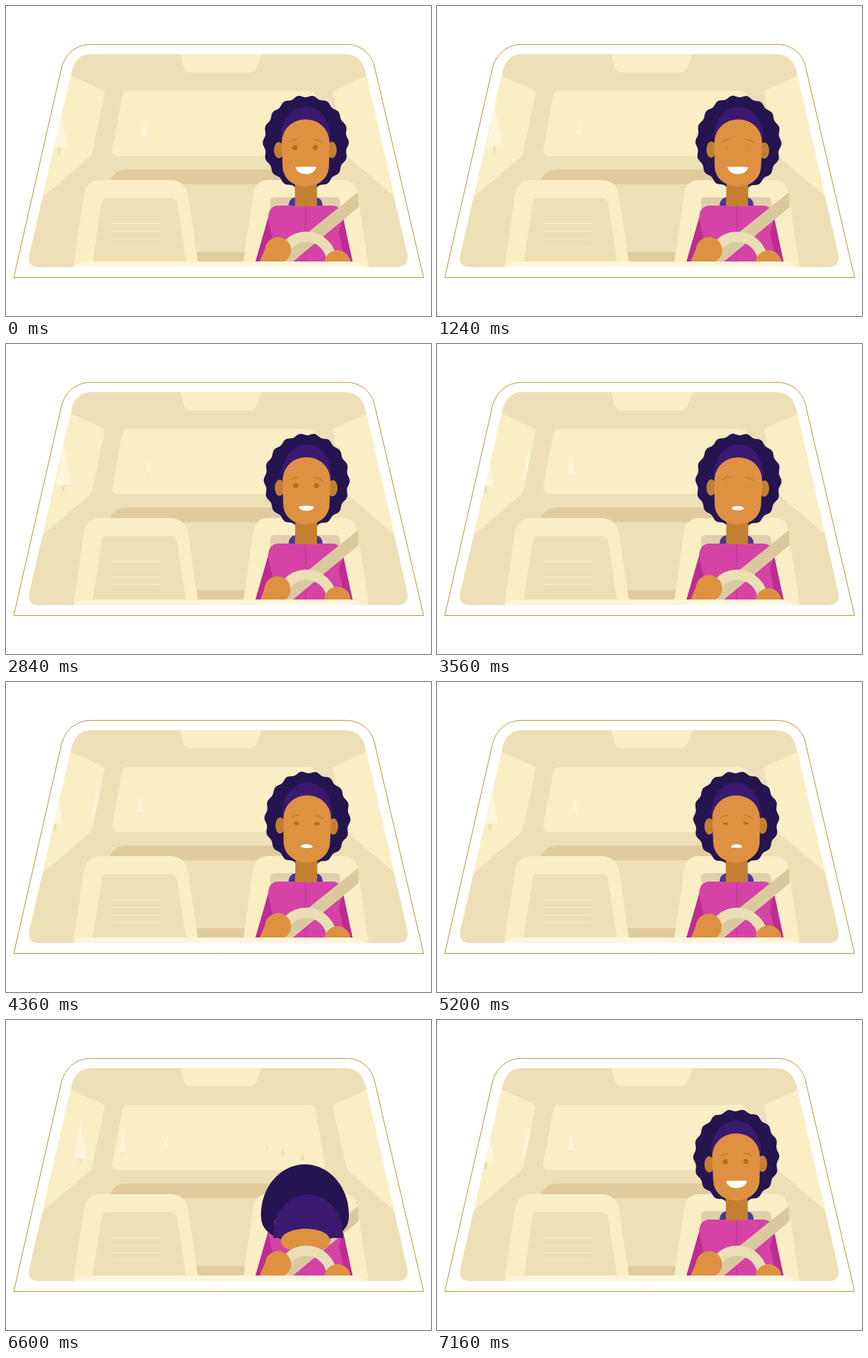
These frames come from a looping animation (600x438 px, 7.2 s). An HTML page with a canvas:

```html
<!DOCTYPE html>
<html lang="en">
<head>
<meta charset="utf-8">
<title>Drowsy driver</title>
<style>
html, body { margin: 0; width: 100%; height: 100%; overflow: hidden; background: #fff; }
canvas { display: block; }
</style>
</head>
<body>
<canvas id="stage" width="600" height="438"></canvas>
<script>
const LOOP = 7200, STEP = 40;
const ctx = document.getElementById('stage').getContext('2d');

const cream = '#faeec5', beige = '#ede0b6', sand = '#dfcb9e', pale = '#fdf5dc';
const skin = '#dd9141', skinDark = '#c57f32', eyeBrown = '#ae701c';
const hairDark = '#241450', capPurple = '#3a1a70', pink = '#d543a6', pinkDark = '#bd2c92';

const frame = new Path2D('M11 383.5L78 89C83 67 100 54.3 119 54.3H481C500 54.3 517 67 521 89L589.5 383.5Z');
const cabin = new Path2D('M119 68H480C494 68 504 77 507.500 92L567 352Q569 369 553 369H46Q30 369 32.500 352L92 95C95 78 105 68 119 68Z');
const rearWindow = 'M164 127Q166 120 173 120H428Q435 120 437 127L450 203Q451 212 441 212H159Q149 212 150 203Z';
const leftWindow = 'M86 96L135 118Q140 120 139 125L122 205Q121 211 116 215L46 275Z';
const rightWindow = 'M515 96L466 118Q461 120 462 125L480 206Q481 211 485 215L555 275Z';
const glass = new Path2D(rearWindow + leftWindow);

function fill(color, path) {
  ctx.fillStyle = color;
  ctx.fill(typeof path === 'string' ? new Path2D(path) : path);
}

function stroke(color, width, path) {
  ctx.strokeStyle = color;
  ctx.lineWidth = width;
  ctx.stroke(typeof path === 'string' ? new Path2D(path) : path);
}

function oval(color, x, y, rx, ry = rx) {
  ctx.fillStyle = color;
  ctx.beginPath();
  ctx.ellipse(x, y, rx, ry, 0, 0, Math.PI * 2);
  ctx.fill();
}

const mix = (a, b, k) => a + (b - a) * k;

// Eased interpolation over rows of [time, ...values].
function key(t, rows) {
  const i = rows.findIndex(row => row[0] > t);
  if (i === 0) return rows[0].slice(1);
  if (i < 0) return rows[rows.length - 1].slice(1);
  const [a, b] = [rows[i - 1], rows[i]];
  const u = (t - a[0]) / (b[0] - a[0]), k = u * u * (3 - 2 * u);
  return a.slice(1).map((v, j) => mix(v, b[j + 1], k));
}

// [time, half width, corner y, top y, bottom y]
const mouthKeys = [
  [1300, 14.5, 227.5, 227, 237.5], [2120, 12.8, 228.3, 228, 236.5],
  [3560, 8.7, 232, 229, 235], [5200, 8, 233, 229.3, 234.2],
  [6640, 8, 233, 229.3, 234.2], [6760, 14.5, 227.5, 227, 237.5]
];
const eyeKeys = [
  [1120, 1], [1200, .08], [1280, .08], [1400, 1], [2600, 1], [2680, .08], [2800, 1],
  [3400, 1], [3520, .08], [3640, .08], [3800, .7], [4600, .7], [4680, .08], [4840, .5],
  [5400, .5], [6000, .08], [6640, .08], [6720, 1], [6960, 1], [7000, .08], [7080, 1]
];
const nodKeys = [[6120, 0], [6400, 1], [6620, 1], [6720, 0]];
const stretchKeys = [[6640, 1], [6720, 1.325], [6840, 1]];
// [time, head tilt, wheel turn] in degrees
const swayKeys = [[0, -.3, 0], [80, -.8, -1.5], [200, -.1, -5], [360, 1.2, 0], [600, 1.2, 0], [640, -.3, 0]];

function trees(t) {
  ctx.save();
  ctx.clip(glass);
  const shift = t / STEP % 10 * 6;
  for (let x = 15 + shift; x < 246; x += 60) {
    const d = x - 80, top = 140 + .195 * d, base = 199 - .144 * d, w = 11 - .061 * d;
    ctx.fillStyle = beige;
    ctx.fillRect(x - w * .18, base, w * .36, (base - top) * .16);
    fill(pale, `M${x - w} ${base}L${x} ${top}L${x + w} ${base}Z`);
  }
  ctx.restore();
  ctx.fillStyle = beige;
  ctx.fillRect(366.5, 179, 2.5, 5);
  ctx.fillRect(389, 184.5, 3.5, 7);
  ctx.fillRect(416, 190, 4.5, 8.5);
}

function interior(t) {
  fill(beige, cabin);
  fill(cream, 'M246 68L250 84Q252 94 262 94H343Q351 94 354 86L361 68Z');
  fill(cream, rearWindow + leftWindow + rightWindow);
  trees(t);
  fill(sand, 'M144 252Q151 231 170 231H431Q449 231 457 252ZM262 348H342V362H262Z');
  fill(cream, 'M95 369L110 267Q113 246 134 246H231Q253 246 257 267L272 369Z');
  fill(beige, 'M122 364L135 279Q136 271.500 142 271.500H233Q240 271.500 241.500 279L254.500 364Z');
  for (let y = 307.5; y < 345; y += 10.8) stroke('#f9eec8', 1.3, `M150 ${y}H218`);
  fill(cream, 'M334 369L349 265Q352 246 370 246H476Q493 246 496 263L512 369Z');
  fill('#dfd0ab', 'M373 310V276Q373 270 379 270H465Q471 270 471.500 276L476 310Z');
}

function body() {
  fill('#45389a', 'M399 283Q399 271 410 270H436Q447 271 447 283Z');
  fill(pink, 'M370 299Q371 282 385 282H460Q474 282 476 299L489 362H352Z');
  fill(pinkDark, 'M370 300L352 362H368L376 328ZM476 300L489.500 362H479L470 320Z');
  stroke(pinkDark, .8, 'M423 282V361');
  fill('#dac99f', 'M495 264.500Q497 263 497 266L498 284L404 362H374Z');
}

function hair(nod) {
  ctx.beginPath();
  for (let i = 0; i < 144; i++) {
    const a = i / 72 * Math.PI, s = Math.sin(a), c = Math.cos(a);
    const wave = -1.5 * Math.cos(18 * a);
    const drop = c > 0 ? 275 - 71 * c : 275 + 40 * (-c) ** .8;
    ctx.lineTo(mix(423.7 + (59.3 + wave) * s, 422 + 62 * s, nod),
               mix(193 - (65.5 + wave) * c, drop, nod));
  }
  ctx.fillStyle = hairDark;
  ctx.fill();
}

function features(t, dy) {
  const open = key(t, eyeKeys)[0];
  ctx.save();
  ctx.translate(0, dy);
  stroke(eyeBrown, 1, 'M401 192.500Q405 188.500 412 188.500M434 188.500Q442 188.500 446 193.500');
  for (const x of [408.3, 437.3]) oval(eyeBrown, x, 200, 3.6, 3.6 * open);
  const [w, y, top, low] = key(t, mouthKeys);
  const up = y + (top - y) / .75, down = y + (low - y) / .75, c = w * .9;
  ctx.translate(423.5, 0);
  fill('#fff', `M${-w} ${y}C${-c} ${up} ${c} ${up} ${w} ${y}C${c} ${down} ${-c} ${down} ${-w} ${y}Z`);
  ctx.restore();
}

function head(t, tilt) {
  const nod = key(t, nodKeys)[0], m = (a, b) => mix(a, b, nod);
  ctx.save();
  ctx.translate(424, 283);
  ctx.rotate(tilt * Math.PI / 180);
  ctx.scale(1, key(t, stretchKeys)[0]);
  ctx.translate(-424, -283);
  hair(nod);
  ctx.fillStyle = skinDark;
  ctx.fillRect(408, m(235, 280), 31, m(48, 3));
  for (const x of [385.5, 460.5]) oval(skinDark, x, m(203.5, 290), 6.8, 11.5);

  const capL = m(388.5, 377), capR = m(458.5, 476), capY = m(188, 308), capTop = m(127, 226);
  fill(capPurple, `M${capL} ${capY}C${capL} ${capTop} ${capR} ${capTop} ${capR} ${capY}Z`);

  const l = m(389.7, 388), r = m(457.3, 458), brow = m(195, 313), jaw = m(225, 315);
  const top = m(148.5, 289), chin = m(265, 332);
  fill(skin, `M${l} ${brow}C${l} ${top} ${r} ${top} ${r} ${brow}L${r - 1} ${jaw}` +
    `C${r - 1} ${chin} ${l + 1} ${chin} ${l + 1} ${jaw}Z`);
  if (nod < .4) features(t, nod * 110);
  ctx.restore();
}

function wheel(turn) {
  ctx.save();
  ctx.translate(424, 362);
  ctx.rotate(turn * Math.PI / 180);
  ctx.beginPath();
  ctx.arc(0, 0, 36, 0, Math.PI * 2);
  ctx.strokeStyle = '#ebdeb5';
  ctx.lineWidth = 14.5;
  ctx.stroke();
  fill(skin, 'M-56 -24L-68 4H-36Z');
  oval(skin, -40, -17, 18.5);
  oval(skin, 44, 1.5, 18.5);
  ctx.restore();
}

function draw(t) {
  ctx.fillStyle = '#fff';
  ctx.fillRect(0, 0, 600, 438);
  stroke('#b8943f', 1, frame);
  ctx.save();
  ctx.clip(cabin);
  interior(t);
  const awake = key(t % 640, swayKeys);
  const [tilt, turn] = t < 6120 ? awake : [t < 6640 ? 0 : -.8, 0];
  body();
  head(t, tilt);
  wheel(turn);
  fill(pale, 'M95 370Q101 361 112 361H488Q500 361 506 370Z');
  ctx.restore();
}

const start = performance.now();
function tick() {
  const t = (performance.now() - start) % LOOP;
  draw(Math.floor(t / STEP) * STEP);
  requestAnimationFrame(tick);
}
tick();
</script>
</body>
</html>
```
